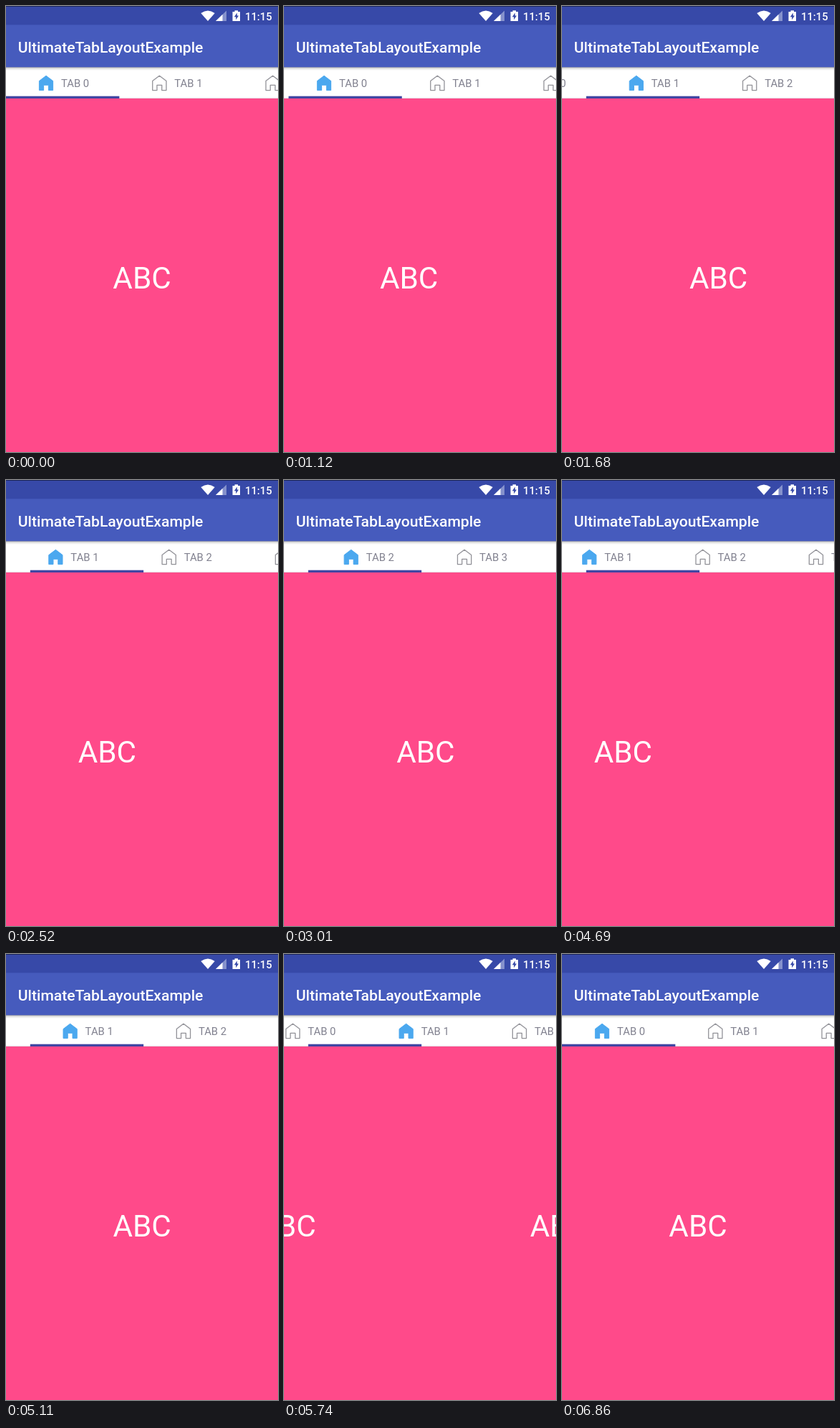
An HTML page that plays this animation: 380x622 px, repeating every 6930 ms.

```html
<!DOCTYPE html>
<html lang="en">
<head>
<meta charset="utf-8">
<title>Tab layout</title>
<style>
  html, body { margin: 0; width: 100%; height: 100%; overflow: hidden; background: #ff4a8a; }
  svg { display: block; width: 380px; height: 622px; font-family: Roboto, "Open Sans", sans-serif; }
  .page { font-size: 42.2px; fill: #fff; text-anchor: middle; }
  .label { font-size: 14.8px; fill: #81818f; }
  .title { font-size: 21.1px; font-weight: 500; fill: #fff; }
  .clock { font-size: 14.8px; font-weight: 500; fill: #fff; }
  .icon { fill: none; stroke: #929298; stroke-width: 1.3; stroke-linejoin: round; }
  .icon.on { fill: #4ba8ef; stroke: #4ba8ef; stroke-width: 1; }
</style>
</head>
<body>
<svg viewBox="0 0 380 622">
  <defs>
    <linearGradient id="shade" x2="0" y2="1">
      <stop offset="0" stop-color="#000" stop-opacity=".38"/>
      <stop offset=".4" stop-color="#000" stop-opacity=".12"/>
      <stop offset="1" stop-color="#000" stop-opacity="0"/>
    </linearGradient>
  </defs>
  <rect width="380" height="622" fill="#ff4a8a"/>
  <g id="pages"></g>

  <rect y="85" width="380" height="44" fill="#fff"/>
  <rect y="128" width="380" height="1" fill="#e6dde2"/>
  <g id="tabs"></g>
  <rect id="bar" y="125.7" width="158.33" height="3.3" fill="#4146a2"/>
  <rect y="85" width="380" height="5" fill="url(#shade)"/>

  <rect y="26" width="380" height="59.3" fill="#465bbd"/>
  <rect width="380" height="26.3" fill="#3749a8"/>
  <rect width="380" height="1" fill="#1d2658"/>
  <text class="title" x="16.8" y="64.6">UltimateTabLayoutExample</text>

  <path d="M272.3 10Q282 2.8 291.7 10L282 21Z" fill="#fff"/>
  <path d="M293 21L308 6.5V21Z" fill="#8591cc"/>
  <path d="M293 21L302.5 11.8V21Z" fill="#fff"/>
  <path d="M316.5 8H319.5V6.3H324V8H327V21H316.5Z" fill="#fff"/>
  <path d="M322.8 9.5L318.8 15.3H321.2V19.3L325 13.5H322.8Z" fill="#3749a8"/>
  <text class="clock" x="334" y="19.8">11:15</text>
</svg>
<script>
const LOOP = 6930, STEP = 70, LAG = 20;
const PAGE_W = 380, TAB_W = 158.33, INSET = 33.8;
const HOUSE = "M46.4 104.6L56 97.3L65.6 104.6V117.6H59.4V110.3H52.6V117.6H46.4Z";

// A finger drags the page by `pull`, then it settles on `to` for `settle` ms.
const swipes = [
  { from: 0, to: 1, start: 1015, release: 1400, pull: .42, power: 1.8, settle: 830 },
  { from: 1, to: 2, start: 2415, release: 2660, pull: .4, power: 1.335, settle: 700 },
  { from: 2, to: 1, start: 4165, release: 4590, pull: .403, power: 1.8, settle: 700 },
  { from: 1, to: 0, start: 5495, release: 5740, pull: .5105, power: 1.3, settle: 600 }
];

const $ = id => document.getElementById(id);

function add(parent, tag, attrs, text = "") {
  const el = document.createElementNS("http://www.w3.org/2000/svg", tag);
  for (const key in attrs) el.setAttribute(key, attrs[key]);
  el.textContent = text;
  return parent.appendChild(el);
}

const pages = [0, 1, 2].map(() =>
  add($("pages"), "text", { class: "page", x: 190, y: 394 }, "ABC"));

const tabs = [0, 1, 2, 3].map(i => {
  const group = add($("tabs"), "g", {});
  const icon = add(group, "path", { class: "icon", d: HOUSE });
  add(group, "text", { class: "label", x: 77, y: 113 }, "TAB " + i);
  return { group, icon };
});

function travel(s, t) {
  if (t <= s.release) return s.pull * ((t - s.start) / (s.release - s.start)) ** s.power;
  const left = Math.max(0, 1 - (t - s.release) / s.settle);
  return 1 - (1 - s.pull) * left ** 5;
}

function stateAt(t) {
  const s = swipes.filter(w => t >= w.start).pop();
  if (!s) return { page: 0, strip: 0, selected: 0 };
  const released = t > s.release;
  const at = time => s.from + (s.to - s.from) * travel(s, time);
  return {
    page: at(t),
    strip: at(released ? Math.max(s.release, t - LAG) : t),
    selected: released ? s.to : s.from
  };
}

const moveX = (el, x) => el.setAttribute("transform", `translate(${x.toFixed(2)} 0)`);

function draw(t) {
  const { page, strip, selected } = stateAt(t);
  const scroll = Math.max(0, strip * TAB_W - INSET);
  pages.forEach((el, i) => moveX(el, (i - page) * PAGE_W + i * .4));
  tabs.forEach(({ group, icon }, i) => {
    moveX(group, i * TAB_W - scroll);
    icon.classList.toggle("on", i === selected);
  });
  $("bar").setAttribute("x", (strip * TAB_W - scroll).toFixed(2));
}

const origin = performance.now();
function tick(now) {
  const t = Math.max(0, now - origin) % LOOP;
  draw(Math.floor(t / STEP) * STEP);
  requestAnimationFrame(tick);
}
draw(0);
requestAnimationFrame(tick);
</script>
</body>
</html>
```
